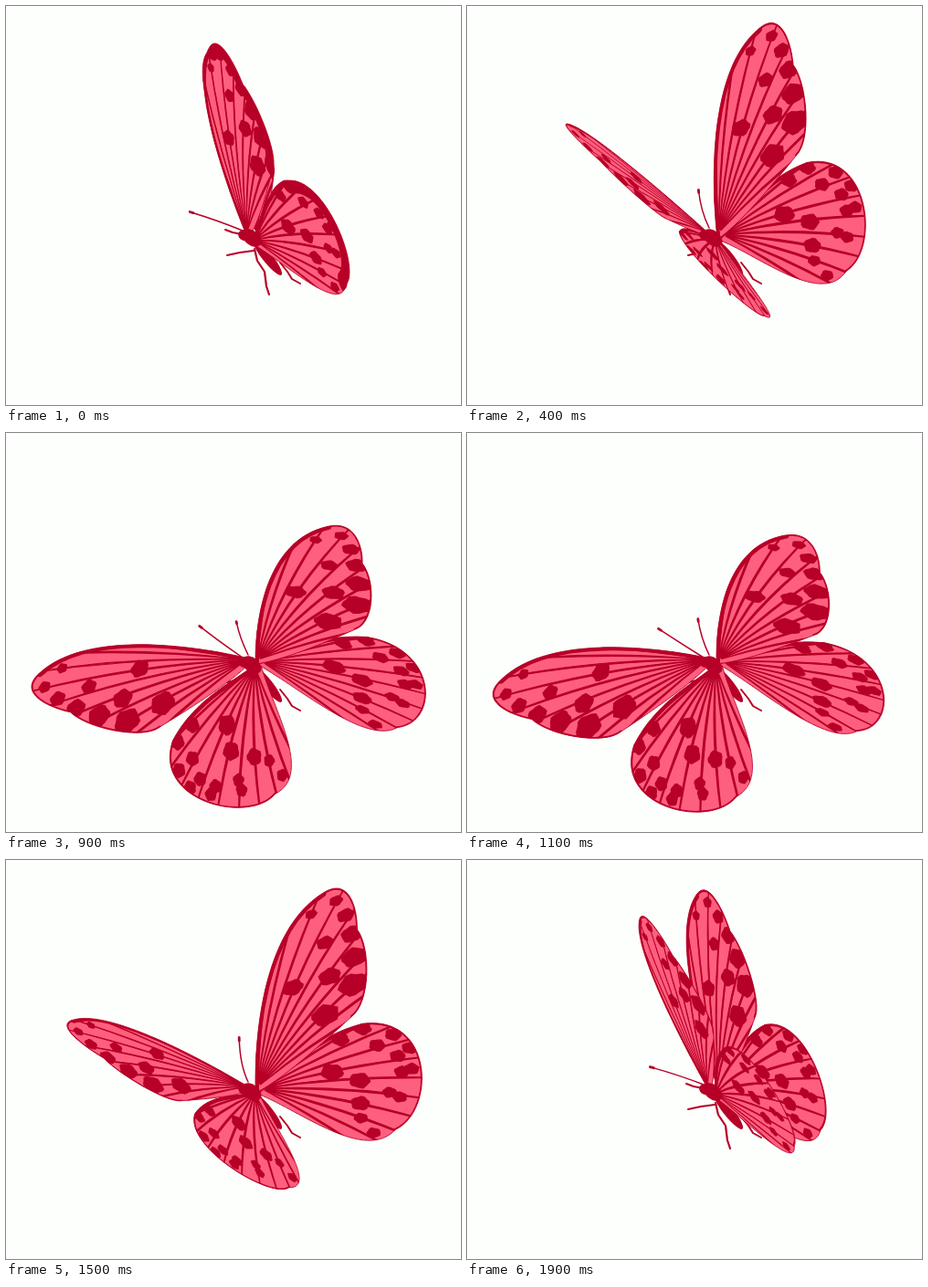
An HTML page with a canvas for the animation above (2000 ms loop, 498 by 437 pixels).

```html
<!DOCTYPE html>
<html lang="en">
<head>
<meta charset="utf-8">
<title>Butterfly</title>
<style>
  html, body { margin: 0; width: 100%; height: 100%; overflow: hidden; background: #fdfffd; }
  canvas { display: block; width: 498px; height: 437px; }
</style>
</head>
<body>
<canvas id="stage" width="498" height="437"></canvas>
<script>
const ctx = document.getElementById('stage').getContext('2d');
const PAPER = '#fdfffd', DARK = '#b70027', PINK = '#ff5f7e';
const LOOP = 2000, STEP = 100, LOWEST = 1027;
const rad = degrees => degrees * Math.PI / 180;

// The wings are flat and turn about the body axis, seen in parallel projection.
const BODY_AXIS = [0.66, 0.75], SIDEWAYS = [1, -0.53], UPWARD = [0.15, -0.76];
const DRAWN_AT = rad(13.6);

function flapAngle(t) {
  const away = Math.abs(t - LOWEST);
  const phase = Math.min(away, LOOP - away) / 1000;
  return rad(125.5 * Math.hypot(phase, 0.12) - 30);
}

function pose(side, angle, hinge) {
  const across = side * Math.cos(angle), up = Math.sin(angle);
  const span = SIDEWAYS.map((v, i) => v * across + UPWARD[i] * up);
  return new DOMMatrix([...BODY_AXIS, ...span, ...hinge]);
}

const FORE = makeWing({
  hinge: [275, 248],
  lead: 'M273 250C274 200 287 92 358 60',
  tip: 'M358 60',
  rim: 'C390 45 397 80 396 100C411 120 408 175 386 187',
  back: 'C360 205 310 240 277 253Z',
  fan: { from: -84, to: -24, count: 11, length: 235, bend: -0.13 },
  tilt: -0.2,
  rows: [
    { from: [320, 152], via: [320, 152], to: [320, 152], count: 1, sizes: [12, 12] },
    { from: [344, 80], via: [374, 122], to: [356, 183], count: 4, sizes: [7, 16] },
    { from: [373, 69], via: [398, 96], to: [389, 155], count: 5, sizes: [8, 17] }
  ]
});

const HIND = makeWing({
  hinge: [280, 250],
  lead: 'M277 250C305 235 340 203 398 195',
  tip: 'M398 195',
  rim: 'C480 193 478 290 431 305',
  back: 'C395 335 325 278 277 256Z',
  fan: { from: -30, to: 34, count: 11, length: 200, bend: -0.08 },
  tilt: 0.15,
  rows: [
    { from: [361, 241], via: [408, 246], to: [392, 275], count: 3, sizes: [13, 11] },
    { from: [372, 209], via: [500, 228], to: [392, 290], count: 6, sizes: [10, 8] },
    { from: [398, 200], via: [505, 215], to: [406, 306], count: 6, sizes: [10, 8] }
  ]
});

const RIGHT_WINGS = [
  { wing: HIND, side: 1, hinge: [280, 250] },
  { wing: FORE, side: 1, hinge: [275, 248] }
];
const LEFT_WINGS = [
  { wing: HIND, side: -1, hinge: [272, 256] },
  { wing: FORE, side: -1, hinge: [263, 248] }
];

function addVeins(path, [x, y], { from, to, count, length, bend }) {
  const at = (r, angle) => [x + r * Math.cos(angle), y + r * Math.sin(angle)];
  for (let i = 0; i < count; i++) {
    const angle = rad(from + (to - from) * i / (count - 1));
    const spread = 0.014;
    path.moveTo(...at(4, angle));
    path.quadraticCurveTo(...at(length / 2, angle + bend - spread), ...at(length, angle));
    path.quadraticCurveTo(...at(length / 2, angle + bend + spread), ...at(4, angle));
  }
}

function addSpot(path, x, y, size, tilt, seed) {
  for (let i = 0; i < 16; i++) {
    const angle = i / 16 * Math.PI * 2;
    const r = size * (1 + 0.09 * Math.sin(seed * 7.3 + i * 1.9));
    const dx = r * Math.cos(angle), dy = r * 0.65 * Math.sin(angle);
    const point = [x + dx * Math.cos(tilt) - dy * Math.sin(tilt),
                   y + dx * Math.sin(tilt) + dy * Math.cos(tilt)];
    i ? path.lineTo(...point) : path.moveTo(...point);
  }
  path.closePath();
}

function addRow(path, { from, via, to, count, sizes }, tilt) {
  for (let i = 0; i < count; i++) {
    const s = count > 1 ? i / (count - 1) : 0, r = 1 - s;
    const [x, y] = from.map((v, k) => v * r * r + 2 * via[k] * r * s + to[k] * s * s);
    addSpot(path, x, y, sizes[0] * r + sizes[1] * s, tilt, i + 1);
  }
}

function makeWing({ hinge, lead, tip, rim, back, fan, tilt, rows }) {
  const veins = new Path2D(), spots = new Path2D();
  addVeins(veins, hinge, fan);
  rows.forEach(row => addRow(spots, row, tilt));
  return {
    veins, spots,
    outline: new Path2D(lead + rim + back),
    lead: new Path2D(lead),
    rim: new Path2D(tip + rim),
    toFlat: pose(1, DRAWN_AT, hinge).inverse()
  };
}

function drawWing({ wing, side, hinge }, angle) {
  const matrix = pose(side, angle, hinge).multiply(wing.toFlat);
  const closing = Math.max(0, (angle - rad(80)) / rad(12));

  ctx.save();
  ctx.setTransform(matrix);
  ctx.clip(wing.outline);
  ctx.fillStyle = PINK;
  ctx.fill(wing.outline);
  ctx.fillStyle = DARK;
  ctx.fill(wing.veins);
  ctx.fill(wing.spots);
  ctx.lineWidth = 1.3;
  ctx.stroke(wing.veins);
  ctx.lineWidth = 8;
  ctx.stroke(wing.lead);
  ctx.lineWidth = 3 + 22 * closing;
  ctx.stroke(wing.rim);
  ctx.restore();

  const edge = new Path2D();
  edge.addPath(wing.outline, matrix);
  ctx.lineWidth = 0.9;
  ctx.stroke(edge);
}

function line(width, ...points) {
  ctx.lineWidth = width;
  ctx.beginPath();
  points.forEach(p => ctx.lineTo(...p));
  ctx.stroke();
}

function feeler(tip, control, root) {
  ctx.lineWidth = 1.5;
  ctx.beginPath();
  ctx.moveTo(...tip);
  ctx.quadraticCurveTo(...control, ...root);
  ctx.stroke();
  line(2.8, tip, tip.map((v, i) => v + (control[i] - v) * 0.12));
}

function blob(x, y, rx, ry, angle) {
  ctx.fillStyle = DARK;
  ctx.beginPath();
  ctx.ellipse(x, y, rx, ry, angle, 0, Math.PI * 2);
  ctx.fill();
}

function drawLimbs(t) {
  const sway = Math.cos((t - 800) / LOOP * Math.PI * 2);
  feeler([206 + 6 * sway, 219 - 8 * sway], [233, 232 - 4 * sway], [259, 246]);
  feeler([254 - 2 * sway, 199 + 8 * sway], [256, 225], [265, 243]);
  line(2, [240, 245], [248, 248], [258, 250]);
  line(2, [242, 273], [256, 270], [271, 268]);
  line(2.2, [272, 266], [275, 279], [283, 291], [285, 307], [288, 316]);
  line(2, [300, 281], [308, 291], [313, 299], [322, 304]);
}

function draw(t) {
  const angle = flapAngle(t);
  ctx.fillStyle = PAPER;
  ctx.fillRect(0, 0, 498, 437);
  ctx.strokeStyle = DARK;
  ctx.lineJoin = ctx.lineCap = 'round';

  drawLimbs(t);
  RIGHT_WINGS.forEach(part => drawWing(part, angle));
  blob(286, 275, 25, 5.5, 0.9);
  LEFT_WINGS.forEach(part => drawWing(part, angle));
  blob(269, 254, 12, 8, 0.7);
  blob(261, 251, 7, 6, 0.3);
}

function tick() {
  draw(Math.floor(performance.now() % LOOP / STEP) * STEP);
  requestAnimationFrame(tick);
}
tick();
</script>
</body>
</html>
```
